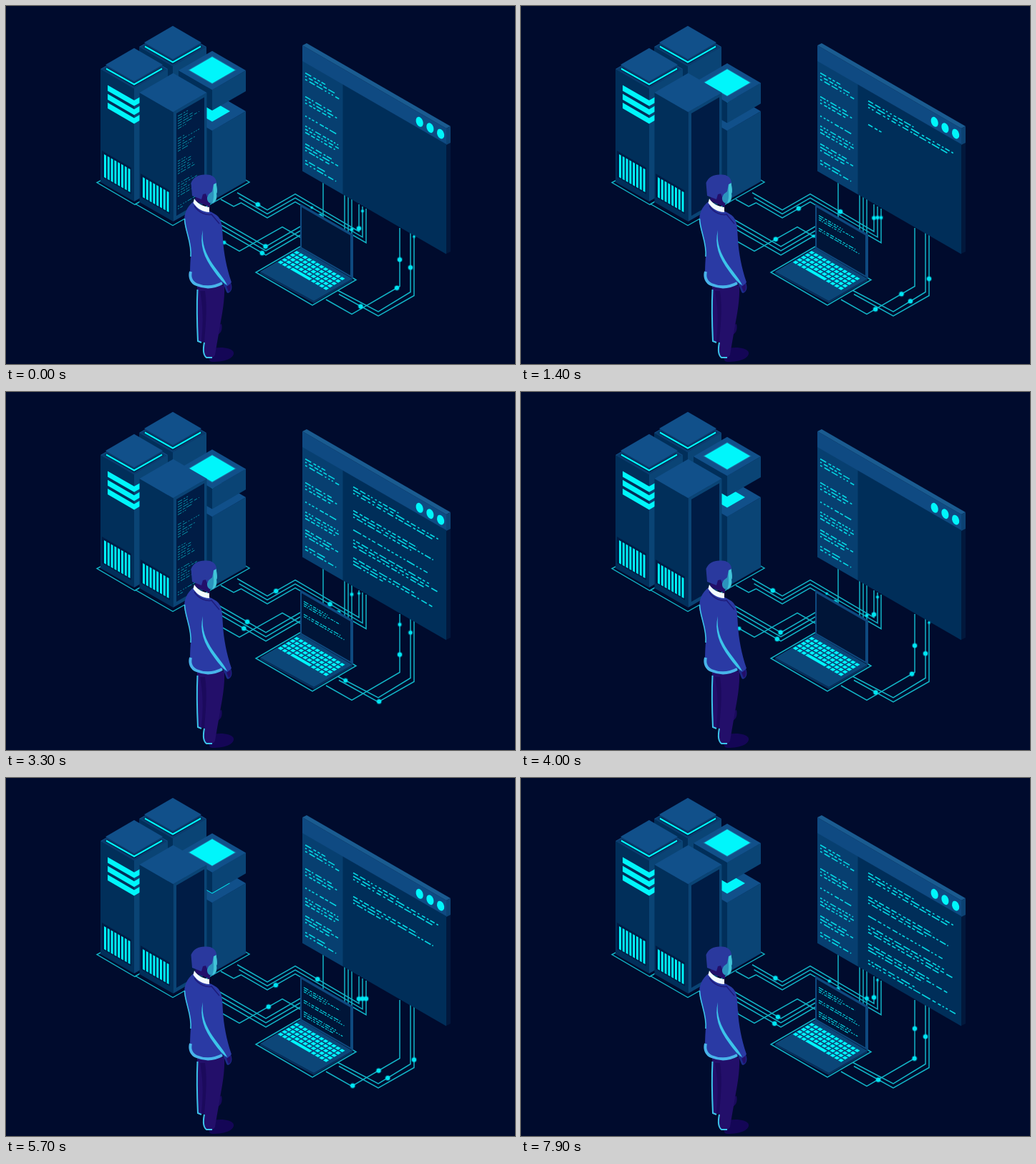
These frames come from a looping animation (711x500 px, 8000 ms). An HTML page with a canvas:

```html
<!DOCTYPE html>
<html lang="en">
<head>
<meta charset="utf-8">
<title>Data centre</title>
<style>
html, body { margin: 0; width: 100%; height: 100%; overflow: hidden; background: #000b2d; }
canvas { display: block; width: 711px; height: 500px; }
</style>
</head>
<body>
<canvas id="c" width="711" height="500"></canvas>
<script>
const ctx = document.getElementById('c').getContext('2d');
const LOOP = 8, CYCLE = 4, SPEED = 42, SLOPE = 0.577;
const CYAN = '#00f6fb', CODE = '#06d6e2', WIRE = '#12b4c6';
const BACK = '#000b2d', TOP = '#11508a', LEFT = '#012f5a', RIGHT = '#0a4475', DARK = '#001c45';

function trace(p, close) {
  ctx.beginPath();
  for (let i = 0; i < p.length; i += 2) ctx.lineTo(p[i], p[i + 1]);
  if (close) ctx.closePath();
}
function poly(fill, ...p) { trace(p, true); ctx.fillStyle = fill; ctx.fill(); }
function line(color, width, ...p) {
  trace(p);
  ctx.strokeStyle = color;
  ctx.lineWidth = width;
  ctx.stroke();
}
function shape(fill, d) { ctx.fillStyle = fill; ctx.fill(new Path2D(d)); }
function curve(color, width, d) {
  ctx.strokeStyle = color;
  ctx.lineWidth = width;
  ctx.stroke(new Path2D(d));
}
function disc(fill, x, y, r) {
  ctx.fillStyle = fill;
  ctx.beginPath();
  ctx.arc(x, y, r, 0, 7);
  ctx.fill();
}
function diamond(fill, x, y, w, h = w * 0.58) {
  poly(fill, x, y - h, x + w, y, x, y + h, x - w, y);
}
// Upright face: left edge at x, y, running w to the right along an isometric axis
function face(fill, x, y, w, h, slope = SLOPE) {
  const d = w * slope;
  poly(fill, x, y, x + w, y + d, x + w, y + d + h, x, y + h);
}

function rng(seed) {
  seed = seed * 7919 + 13;
  const next = () => (seed = (seed * 16807) % 2147483647) / 2147483647;
  for (let i = 0; i < 4; i++) next();
  return next;
}
function ease(a, b, t) {
  const p = Math.min(1, Math.max(0, (t - a) / (b - a)));
  return (1 - Math.cos(Math.PI * p)) / 2;
}

// --- Code on the screens ---

// Row of broken strokes, mostly words with a few long bars
function codeRow(x, y, len, rand, unit, width, slope, color = CODE) {
  ctx.beginPath();
  for (let d = 0; d < len;) {
    const e = Math.min(len, d + unit * (0.25 + 1.1 * rand() ** 2));
    ctx.moveTo(x + d, y + d * slope);
    ctx.lineTo(x + e, y + e * slope);
    d = e + unit * (0.2 + rand() * 0.2);
  }
  ctx.strokeStyle = color;
  ctx.lineWidth = width;
  ctx.stroke();
}
// Blocks of [offset, rows] share one look; rows type on from top to bottom over a cycle
function codeBlocks(blocks, x, y, gap, span, longest, unit, width, t) {
  for (const [off, rows] of blocks) {
    for (let j = 0; j < rows; j++) {
      const dy = off + j * gap;
      const at = 0.2 + 3.3 * (dy / span) ** 0.8;
      const shown = Math.min(1, (t - at) / 0.2);
      const rand = rng(dy + x);
      const len = longest * (j === 1 || rows === 1 ? 0.85 + 0.15 * rand() : 0.5 + 0.45 * rand());
      if (shown > 0) codeRow(x, y + dy, len * shown, rand, unit, width, SLOPE);
    }
  }
}
const page = [[0, 3], [33, 3], [60, 1], [74, 3], [99, 3], [122, 2]];
const smallPage = [[0, 3], [18, 2], [34, 3]];

// --- Wires, and the pulses that run along them ---

const wires = [];
// Each pulse is [start within the cycle, seconds alive]
function wire(pts, ...pulses) { wires.push({ pts, pulses }); }

const upper = [[[3.2, 5.6], [0.95, 1.3]], [[3.85, 1.4], [1.03, 3]], [[1.1, 5.9]]];
const middle = [[[1.87, 3.45]], [], [[2, 3.5]]];
for (let i = 0; i < 3; i++) {
  const x = 493 + 5 * i, d = 5.5 * i, run = 42 - 2.5 * i;
  wire([x, 277 + 3 * i, x, 315 + 7.8 * i, 404, 262.5 + d, 365, 285 + d, 365 - run, 285 + d - run * SLOPE], ...upper[i]);
  wire([285, 291 + 6 * i, 363, 336 + 6 * i, 411, 308 + 6 * i], ...middle[i]);
  wire([473 + 5 * i, 264 + 3 * i, 473 + 5 * i, 313 + 3 * i], ...(i === 2 ? [[3, 1.15]] : []));
}
wire([328, 275, 318, 280, 300, 270]);
wire([443, 247, 443, 295]);
wire([290, 322, 326, 342.5, 386, 308.5, 411, 323], [3.6, 3.4]);
wire([550, 310, 550, 391.5, 483, 430.5, 447, 410], [2.95, 3.4], [1.95, 4.2]);
wire([565, 317, 565, 399.5, 520, 427, 462, 396.5], [2.85, 4.7]);
wire([570, 320, 570, 404.5, 520, 433, 465, 402.5], [3.95, 4.8]);

function along(p, s) {
  for (let i = 0; i < p.length - 2; i += 2) {
    const dx = p[i + 2] - p[i], dy = p[i + 3] - p[i + 1], len = Math.hypot(dx, dy);
    if (s <= len) return [p[i] + dx * s / len, p[i + 1] + dy * s / len];
    s -= len;
  }
  return null;
}
function drawPulses(t) {
  for (const { pts, pulses } of wires) {
    for (const [start, life] of pulses) {
      for (let age = (t - start + 2 * CYCLE) % CYCLE; age < life; age += CYCLE) {
        const at = along(pts, age * SPEED);
        if (!at) break;
        const r = 3 * Math.min(1, 0.4 + age, 0.4 + (life - age) * 2);
        disc('rgba(0,210,235,.3)', ...at, r + 1.2);
        disc('#00e6f2', ...at, r);
      }
    }
  }
}

// --- Servers ---

// Box whose diamond top peaks at x, y
function tower(x, y, h) {
  face(LEFT, x - 47, y + 28, 47, h);
  face(RIGHT, x, y + 55, 47, h, -SLOPE);
  diamond(TOP, x, y + 28, 47);
}
function cap(x, y) {
  diamond('#0a3b6c', x, y + 29.5, 46);
  diamond(DARK, x, y + 29.5, 41);
  line(CYAN, 2.2, x - 39, y + 28.5, x, y + 50.5, x + 39, y + 28.5);
  diamond('#0a3a6a', x, y + 25.5, 40);
  diamond(TOP, x, y + 23, 40);
}
function vents(x, y, h) {
  face(DARK, x - 3, y - 5, 41, h + 5);
  for (let i = 0; i < 8; i++) face(CYAN, x + i * 4.8, y + i * 4.8 * SLOPE, 2.9, h);
}
function rackText(t) {
  const shown = t < 0.45 ? 1 : t < 3.9 ? (t - 2.2) / 0.9 : 0;
  const rand = rng(42);
  for (let i = 0; i < 38; i++) {
    const len = 8 + rand() * 25;
    if (i % 9 < 6 && i / 38 < shown)
      codeRow(240, 154 + i * 3.5, len, rng(i + 5), 6, 1, -SLOPE, '#0793a9');
  }
}
function drawServers(t) {
  line(WIRE, 1.4, 134, 243, 127, 246.5, 180, 277.5, 186, 274);
  line(WIRE, 1.4, 187, 273, 181, 276.5, 233, 306.5, 340, 246, 333, 242);

  tower(233, 29, 60);
  cap(233, 28);

  tower(179, 60, 158);
  cap(179, 59);
  for (let i = 0; i < 3; i++) {
    const y = 110.5 + i * 12.3;
    face(CYAN, 142, y, 37, 8);
    face(CYAN, 179, y + 37 * SLOPE, 8, 8, -SLOPE);
  }
  vents(137, 207, 32);

  // The block sinks onto its stand, then climbs slowly; the second dip is quicker
  tower(288, 119, 98);
  diamond(CYAN, 288, 147, 25);
  const c = t % CYCLE;
  const sink = ease(0, 0.8, c) - ease(1.33, 2.67, c) + ease(2.67, 3.33, c) - ease(3.33, 4, c);
  const y = 62 + 17.5 * sink;
  tower(288, y, 29);
  diamond('#1c6da0', 288, y + 27.5, 34);
  diamond(CYAN, 288, y + 27.5, 32);

  tower(233.5, 93, 153);
  face(DARK, 238, 150, 39, 143, -SLOPE);
  vents(191, 239, 28);
  rackText(t);
}

// --- Screen and laptop ---

function drawScreen(t) {
  face('#02183c', 615, 193, 6, 153, -0.5);
  face('#002e59', 414, 76.5, 201, 154);
  face('#073f70', 414, 76.5, 56.5, 154);
  face('#0f4a82', 414, 55, 201, 22);
  poly('#1a5b90', 414, 55, 420, 52, 621, 168, 615, 171);
  face('#0c4273', 615, 171, 6, 23, -0.5);
  ctx.fillStyle = CYAN;
  for (let i = 0; i < 3; i++) {
    ctx.beginPath();
    ctx.ellipse(577.7 + i * 14.7, 161.8 + i * 8.4, 4.7, 7.2, -0.35, 0, 7);
    ctx.fill();
  }
  codeBlocks(page, 418, 93.5, 4.5, 122, 50, 8, 1.6, CYCLE);
  codeBlocks(page, 485, 132.5, 4.5, 122, 122, 9, 1.6, t % CYCLE);
}

function drawLaptop(t) {
  poly(BACK, 349, 372, 411, 335, 489, 382, 428, 418);
  line(WIRE, 1.5, 411, 336, 349, 372, 428, 418, 489, 382.5, 483, 379);
  poly('#06305c', 355, 371, 430, 412, 484, 381, 484, 384, 430, 415, 355, 374);
  poly('#0c4678', 355, 371, 411, 338, 484, 381, 430, 412);
  face('#0e4a80', 411, 276, 74, 62);
  face('#001538', 413, 281, 68, 56);
  codeBlocks(smallPage, 416, 292.5, 3, 45, 58, 5, 1.1, 2 * (t % 2));

  // Keys: u runs to the right and down, v to the left and down
  const at = (u, v) => [406 + 69 * u - 28 * v, 342 + 39.5 * u + 17 * v];
  const key = (u, v, w) =>
    poly(CYAN, ...at(u, v), ...at(u + w, v), ...at(u + w, v + 0.14), ...at(u, v + 0.14));
  for (let r = 0; r < 5; r++) {
    for (let c = 0; c < 12; c++) {
      if (r < 4 || c < 3 || c > 7) key(c / 12, r / 5, 0.062);
    }
  }
  key(3 / 12, 0.8, 0.39);
}

function drawMan() {
  const suit = '#2a3aa4', dark = '#230f6a', light = '#3cc4ea';
  // Shoes and trousers
  shape('#140656', 'M287 479C296 475 317 477 318 484C319 491 308 497 288 497C281 497 283 484 287 479Z');
  shape('#190a5c', 'M296 446L301 444C303 452 300 457 295 460Z');
  shape(dark, 'M267 390L305 390C306 410 302 430 298 452L292 487C290 493 279 493 277 489L277 469L269 469C267 446 266 420 267 390Z');
  shape('#1b0a5c', 'M278 398C282 425 278 452 277 470L273 468C276 440 275 420 271 398Z');
  curve(light, 2, 'M267.5 396C266 425 267 447 268 468L273 470');
  curve(light, 2, 'M277 470C275 480 276 488 280 491L288 491');
  // Hand
  shape('#1c2c8a', 'M303 388L313 385C317 391 316 399 310 401C307 400 307 394 303 388Z');
  shape(dark, 'M308 392L314 388C315 394 314 398 311 399Z');
  // Jacket
  shape(suit, 'M262 273C252 281 249 290 249 301C251 316 259 330 258 350C257 362 257 373 257 381C267 395 288 396 303 387L309 391L315 386C308 366 304 344 303 326C302 308 302 298 294 292C287 287 274 283 262 273Z');
  curve(light, 1.6, 'M249.5 297C250 314 260 331 258 350');
  curve('#48b4ea', 4, 'M258 371C256 379 259 386 266 389C278 394 291 393 302 387');
  shape(light, 'M275 313C270 333 276 351 291 371C298 381 304 387 309 390C305 381 296 371 289 361C279 346 273 332 275 313Z');
  curve('#1e1c7c', 1.6, 'M263 279C269 289 281 293 287 291L298 304');
  // Head
  shape(dark, 'M266 260L285 258L285 281L264 272Z');
  shape('#2b93bd', 'M283 262L289 248L293.5 246C294 252 296 259 294 262C295 269 293 276 287 276C281 275 279 268 283 262Z');
  shape('#41c5d8', 'M290 249L293.5 246C294 252 296 259 294 262C295 268 293 274 288 275C292 267 289 258 290 249Z');
  shape('#2a399e', 'M260 265L258.5 247C262 238 270 235 279 235.5C288 235 294 240 294 247L290 249L288 259L283 263L281 267L279 262L275 263L273 270Z');
  shape('#f2fbff', 'M263 269L261.5 275C267 283 275 288 284 288L284 281C276 280 268 277 263 269Z');
}

function draw(now) {
  const t = (now / 1000) % LOOP;
  ctx.fillStyle = BACK;
  ctx.fillRect(0, 0, 711, 500);
  for (const w of wires) line(WIRE, 1.5, ...w.pts);
  drawServers(t);
  drawScreen(t);
  drawPulses(t);
  drawLaptop(t);
  drawMan();
}

const start = performance.now();
function frame() {
  draw(performance.now() - start);
  requestAnimationFrame(frame);
}
frame();
</script>
</body>
</html>
```
